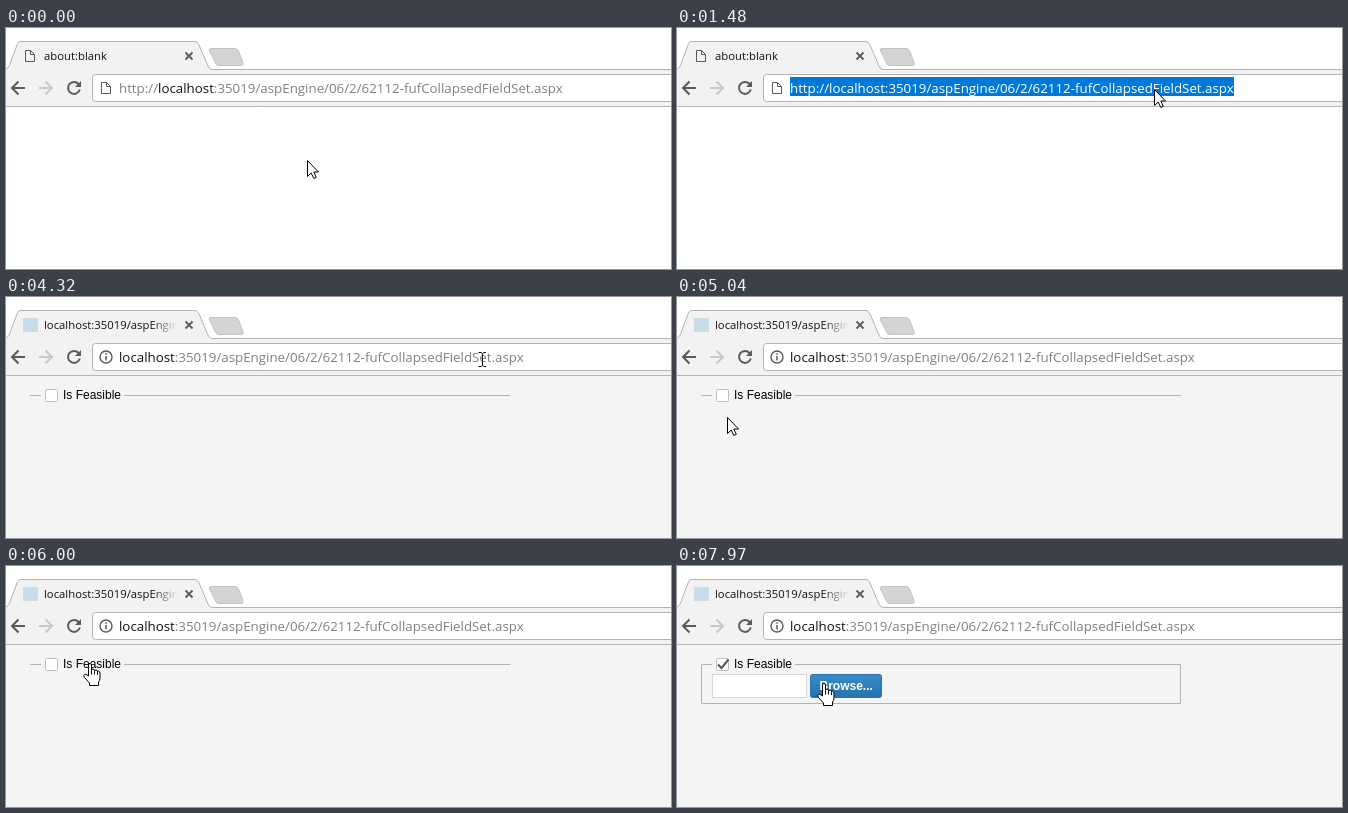
Write an HTML page that moves like this. It is 665 px wide and 241 px high and loops after 8000 ms.

```html
<!DOCTYPE html>
<html lang="en">
<head>
<meta charset="utf-8">
<title>Collapsible field set</title>
<style>
  html, body { margin: 0; width: 100%; height: 100%; overflow: hidden; background: #fff; }
  svg { display: block; width: 665px; height: 241px; }
  text { white-space: pre; }
  .ui { font-family: "Open Sans", "Noto Sans", sans-serif; }
  .url { font-size: 13.32px; fill: #808080; }
  .title { font-size: 11.3px; fill: #111; }
  .form { font: 12px "Liberation Sans", Arial, sans-serif; }
  .line { fill: none; stroke: #5a5a5a; }
</style>
</head>
<body>
<svg viewBox="0 0 665 241">
  <defs>
    <linearGradient id="fade" gradientUnits="userSpaceOnUse" x1="146" x2="172" y1="0" y2="0">
      <stop stop-color="#111"/><stop offset="1" stop-color="#111" stop-opacity="0"/>
    </linearGradient>
    <linearGradient id="blue" x2="0" y2="1">
      <stop stop-color="#4a9ad8"/><stop offset="1" stop-color="#2c81c4"/>
    </linearGradient>
    <linearGradient id="blueHover" x2="0" y2="1">
      <stop stop-color="#3a8bc8"/><stop offset="1" stop-color="#2672ae"/>
    </linearGradient>
    <path id="sheet" d="M.5.5H5.5L9.5 4.5V11.5H.5ZM5.5.5V4.5H9.5"/>
  </defs>

  <rect id="page" y="79" width="665" height="162" fill="#fff"/>

  <!-- browser frame -->
  <rect y="41" width="665" height="37" fill="#f2f2f2"/>
  <path d="M0 41C3 40 4 36 5 33L11 17C12 14 13 13.5 15 13.5H188C191 13.5 192 15 193 17L202 38C203 41 205 41.5 207 41.5H665V42H0Z" fill="#f2f2f2"/>
  <path d="M0 41C3 40 4 36 5 33L11 17C12 14 13 13.5 15 13.5H188C191 13.5 192 15 193 17L202 38C203 41 205 41.5 207 41.5H665" fill="none" stroke="#b2b2b2"/>
  <path d="M205 20.5H229Q231.500 20.500 232.500 23L237 34.500Q238 37.500 235 37.500H213Q210.500 37.500 209.500 35L203.500 23Q202.500 20.500 205 20.500Z" fill="#d4d4d4" stroke="#c2c2c2"/>
  <path d="M0 78.500H665" stroke="#b6b6b6"/>
  <rect x="86.500" y="46.500" width="590" height="27" rx="3" fill="#fff" stroke="#b4b4b4"/>
  <path class="line" stroke-width="1.800" d="M179.500 24.500L186.500 31.500M186.500 24.500L179.500 31.500"/>
  <path class="line" stroke-width="2" d="M19 60H6.500M12.500 53.500L6 60L12.500 66.500"/>
  <path class="line" stroke-width="2" style="stroke:#c9c9c9" d="M33 60H45.500M39.500 53.500L46 60L39.500 66.500"/>
  <g id="reload">
    <path class="line" stroke-width="2" d="M72.600 56A6 6 0 1 0 73.800 61.500"/>
    <path d="M75 53V59H69Z" fill="#5a5a5a"/>
  </g>
  <path id="stop" class="line" stroke-width="2" d="M62.500 54.500L73.500 65.500M73.500 54.500L62.500 65.500"/>

  <!-- tab -->
  <g id="blankTab">
    <use href="#sheet" x="19" y="22" class="line"/>
    <text class="ui title" x="38" y="32">about:blank</text>
  </g>
  <text id="siteTitle" class="ui title" x="38" y="32" style="fill:url(#fade)">localhost:35019/aspEngin</text>
  <path id="spinner" fill="none" stroke-width="2" d="M24 21A7 7 0 1 1 17 28"/>
  <rect id="siteIcon" x="17" y="21" width="15" height="14" fill="#c9dcea"/>

  <!-- address -->
  <use id="sheetIcon" href="#sheet" x="95" y="54" class="line"/>
  <g id="infoIcon">
    <circle class="line" cx="100" cy="60" r="6" stroke-width="1.400"/>
    <path class="line" stroke-width="1.500" d="M100 59V63.500M100 56.300V57.800"/>
  </g>
  <rect id="selection" x="113" y="49" width="444" height="19" fill="#0078d7"/>
  <text id="url" class="ui url" x="113" y="65"><tspan id="scheme">http://</tspan><tspan id="host">localhost</tspan><tspan>:35019/aspEngine/06/2/62112-fufCollapsedFieldSet.aspx</tspan></text>

  <!-- form -->
  <g id="form">
    <path id="closed" fill="none" stroke="#b3b3b3" d="M24 98.500H35M118 98.500H504"/>
    <g id="open">
      <path fill="none" stroke="#b3b3b3" d="M35 98.500H24.500V137.500H503.500V98.500H118"/>
      <rect x="35.500" y="108.500" width="94" height="23" fill="#fff" stroke="#d9d9d9"/>
      <rect id="button" x="133.500" y="108.500" width="71" height="23" rx="2" stroke="#2a74b0"/>
      <text class="form" x="142.500" y="124" font-weight="700" fill="#fff" style="font-weight:700">Browse...</text>
    </g>
    <rect x="39.500" y="92.500" width="12" height="12" rx="1" fill="#fff" stroke="#bfbfbf"/>
    <path id="tick" fill="none" stroke="#5c5c5c" stroke-width="2.200" d="M41 98.500L44.500 102L51.500 93.500"/>
    <text class="form" x="57" y="102">Is Feasible</text>
  </g>

  <!-- pointers, each drawn with its hot spot at 0,0 -->
  <g id="arrow">
    <path d="M.5.5V16.500L4.200 13L6.800 18.500L9.300 17.400L6.800 12H11.500Z" fill="#fff" stroke="#000"/>
  </g>
  <g id="beam">
    <path d="M-3.500-6.500H-1L.5-5.500L2-6.500H4M.5-5.500V6.500M-3.500 7.500H-1L.5 6.500L2 7.500H4" fill="none" stroke="#111"/>
  </g>
  <g id="hand">
    <path d="M-.5 13V2Q-.5.5 1 .5T2.500 2V7.500Q2.500 6 4 6T5.500 7.500V8.500Q5.500 7 7 7T8.500 8.500V9.500Q8.500 8 9.500 8T11 10V15Q11 17.500 9.500 19V22.500H.5V20L-4.500 14.500Q-6 12.500-4.500 11.500T-2 12Z" fill="#fff" stroke="#000" stroke-linejoin="round"/>
    <path d="M2.500 7.500V11.500M5.500 8.500V11.500M8.500 9.500V12" fill="none" stroke="#000"/>
  </g>
</svg>
<script>
const LOOP = 8000;
const SELECT = 1480, LOAD = 3140, COMMIT = 3500, LOADED = 3730, RENDER = 3890, EXPAND = 7170;

// time, x, y of the pointer's hot spot
const path = [
  [640, 301, 132], [800, 324, 113], [950, 384, 81], [1100, 440, 60],
  [1200, 465, 56], [1300, 478, 58], [1380, 477, 61],
  [4300, 477, 62], [4370, 474, 63], [4500, 385, 75], [4640, 240, 92],
  [4800, 120, 113], [4920, 65, 122], [5040, 50, 120], [5100, 47, 120],
  [5120, 47, 120], [5250, 43, 109], [5380, 40, 100],
  [5550, 40, 100], [5610, 50, 99], [5670, 66, 97], [5800, 77, 99], [6000, 83, 97],
  [7770, 83, 97], [7850, 105, 105], [7910, 126, 113], [7970, 146, 117]
];

const $ = id => document.getElementById(id);
const show = (id, on) => { $(id).style.display = on ? "" : "none"; };
const inside = (x, y, l, t, r, b) => x >= l && x < r && y >= t && y < b;

function pointerAt(t) {
  const i = path.findIndex(p => p[0] > t);
  if (i < 1) return (i ? path[path.length - 1] : path[0]).slice(1);
  const [t0, x0, y0] = path[i - 1], [t1, x1, y1] = path[i];
  const k = (t - t0) / (t1 - t0);
  return [Math.round(x0 + (x1 - x0) * k), Math.round(y0 + (y1 - y0) * k)];
}

function pointerKind(t, x, y) {
  if (t >= SELECT && t < LOAD) return "arrow";
  if (inside(x, y, 110, 47, 665, 74)) return "beam";
  if (t >= RENDER && inside(x, y, 55, 92, 116, 105)) return "hand";
  if (t >= EXPAND && inside(x, y, 133, 108, 205, 132)) return "hand";
  if (t >= EXPAND && inside(x, y, 35, 108, 130, 132)) return "beam";
  return "arrow";
}

function render(t) {
  const selected = t >= SELECT && t < LOAD;
  const started = t >= LOAD, loading = started && t < LOADED;
  const rendered = t >= RENDER, expanded = t >= EXPAND;

  show("blankTab", !started);
  show("siteTitle", started);
  show("spinner", loading);
  show("siteIcon", t >= LOADED);
  show("reload", !loading);
  show("stop", loading);
  show("sheetIcon", t < COMMIT);
  show("infoIcon", t >= COMMIT);
  show("selection", selected);
  show("scheme", !started);
  $("url").style.fill = selected ? "#fff" : "";
  $("host").style.fill = selected ? "#fff" : "#111";

  const waiting = t < COMMIT;
  $("spinner").setAttribute("stroke", waiting ? "#8a8a8a" : "#4285f4");
  $("spinner").setAttribute("transform", `rotate(${(t - LOAD) * (waiting ? -0.25 : 0.4)} 24 28)`);

  $("page").setAttribute("fill", rendered ? "#f4f4f4" : "#fff");
  show("form", rendered);
  show("closed", !expanded);
  show("open", expanded);
  show("tick", expanded);

  const [x, y] = pointerAt(t), kind = pointerKind(t, x, y);
  for (const id of ["arrow", "beam", "hand"]) show(id, id === kind);
  $(kind).setAttribute("transform", `translate(${x} ${y})`);
  $("button").setAttribute("fill", x >= 133 ? "url(#blueHover)" : "url(#blue)");
}

const start = performance.now();
function tick() {
  render((performance.now() - start) % LOOP);
  requestAnimationFrame(tick);
}
tick();
</script>
</body>
</html>
```
